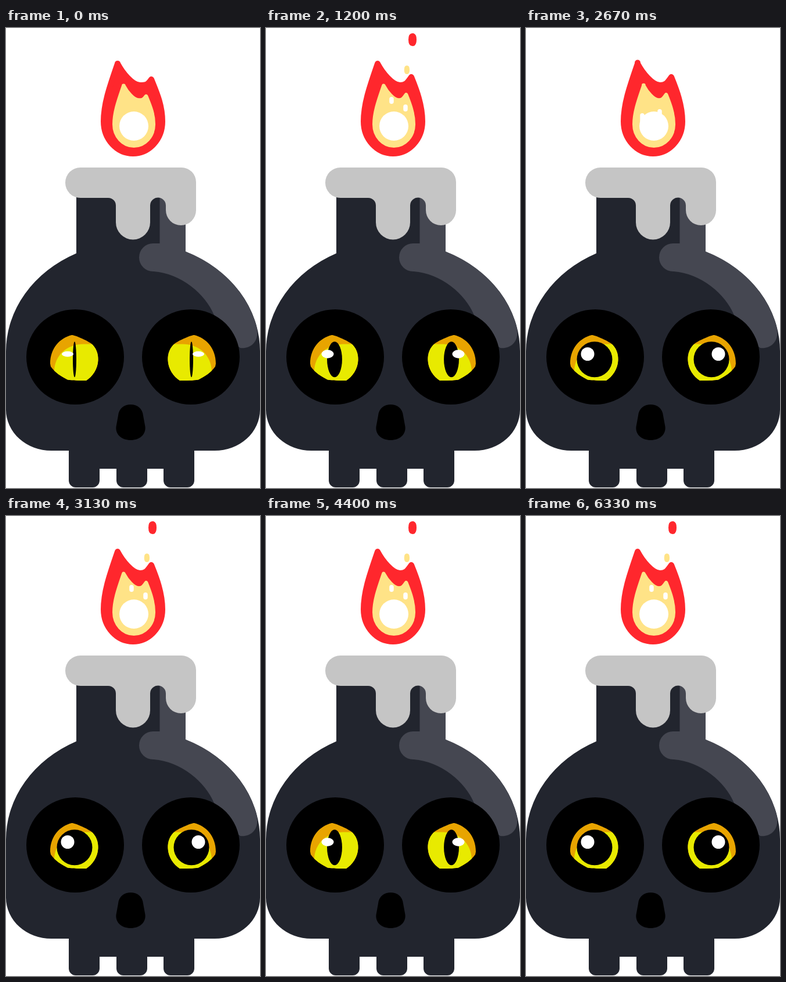
Animation, 437 px wide and 788 px high, one loop 6410 ms. Source, as an HTML page:

```html
<!DOCTYPE html>
<html lang="en">
<head>
<meta charset="utf-8">
<title>Skull candle</title>
<style>
html, body { margin: 0; width: 100%; height: 100%; overflow: hidden; background: #fff; }
svg { display: block; width: 100vw; height: 100vh; }
</style>
</head>
<body>
<svg viewBox="0 0 437 788">
  <defs>
    <clipPath id="lid">
      <path d="M76 575C76 548 93 531 113 526C118 526 135 533 146 540C155 547 159 558 158.500 569C158 584 149 597 138 604C127 604 115 604 106 602.500C95 597 84 590 77 580Z"/>
    </clipPath>
    <path id="flame" stroke-width="10" stroke-linejoin="round"/>
    <g id="eye">
      <ellipse cx="119" cy="563.5" rx="84" ry="81.5"/>
      <g clip-path="url(#lid)">
        <rect x="70" y="520" width="95" height="90" fill="#e8a400"/>
        <path d="M83 610V588C84 560 105 541 135 541.5H165V610Z" fill="#e8ea00"/>
      </g>
      <ellipse id="pupil" cx="118" cy="567.7" ry="30.5"/>
      <ellipse id="glint" cx="106" cy="558.5" fill="#fff"/>
    </g>
  </defs>

  <use href="#flame" fill="#ff272d" stroke="#ff272d"/>
  <use href="#flame" fill="#ffe387" stroke="#ffe387" transform="translate(74.3 58.3) scale(.667)"/>
  <circle cx="220" cy="168" r="25" fill="#fff"/>
  <path id="bubbles" stroke="#fff" stroke-width="7.5" stroke-linecap="round"/>

  <path fill="#22252e" d="M121 270H309V383A218.500 187.700 0 0 1 437 554V654A78 70 0 0 1 359 724H324V775A12 12 0 0 1 312 787H283A12 12 0 0 1 271 775V755H243V775A12 12 0 0 1 231 787H202A12 12 0 0 1 190 775V755H161V775A12 12 0 0 1 149 787H120A12 12 0 0 1 108 775V724H78A78 70 0 0 1 0 654V554A218.500 187.700 0 0 1 121 386Z"/>
  <path fill="#454751" d="M264.500 270H309V383A218.500 187.700 0 0 1 431 511C437 536 422 550 403 548L385 535L358 492C343 455 300 420 253 417A24 24 0 0 1 253 369H264.500Z"/>
  <path fill="#c5c5c5" d="M128 239H302A25 25 0 0 1 327 264V312A26 26 0 0 1 275 312V304A13.500 13.500 0 0 0 248 304V333A29.500 29.500 0 0 1 189 333V304A13 13 0 0 0 176 291H128A26 26 0 0 1 128 239Z"/>
  <use href="#eye"/>
  <use href="#eye" transform="translate(437 0) scale(-1 1)"/>
  <path d="M214.500 645C226 645 235 652 236 664L239.500 683C241 697 229 706 214.500 706C200 706 188 697 189.500 683L193 664C194 652 203 645 214.500 645Z"/>
</svg>
<script>
const LOOP = 6410, BEATS = 8;
const el = id => document.getElementById(id);
const mix = (a, b, s) => a + (b - a) * s;
const clamp = u => Math.min(1, Math.max(0, u));
const smooth = u => u * u * (3 - 2 * u);

const LEFT = { x: 192, y: 56, lean: 6, power: 4, release: 5 };
const RIGHT = { x: 250, y: 79, lean: 2, power: 1.5, release: 7 };
const BUBBLES = [
  { x: 200, y: 146, birth: 1 }, { x: 230, y: 139, birth: 1 },
  { x: 216, y: 136, birth: 4 }, { x: 240, y: 149, birth: 4 }
];

// A tongue sheds a drop, recoils, then stretches into a stem until the next drop
function tongue({ x, y, lean, power, release }, beat) {
  const age = (beat - release + BEATS) % BEATS;
  const rise = 56 * clamp((age - 2) / 5) ** power;
  const stem = clamp((rise - 8) / 14);
  const tip = y + 5 - rise + (age === 1 ? 4 : 0);
  const dropX = x + lean - 2;
  return {
    x: x + lean * stem, tip, stem,
    half: 1.7 * stem,
    neck: Math.max(tip, mix(y + 5, 76, stem)),
    drop: age ? "" : `M${dropX} ${y - 59}a2 6 0 0 1 4 0a2 6 0 0 1 -4 0Z`
  };
}

// Inset by half the stroke, whose round joins soften the tips
function flamePath(beat) {
  const l = tongue(LEFT, beat), r = tongue(RIGHT, beat);
  const vx = 231 - 5 * l.stem - 3 * r.stem;
  const vy = 98 - 6 * Math.max(l.stem, r.stem);
  const lx = l.x + l.half, rx = r.x - r.half, end = r.x + r.half;
  return `M168 160C168 128 180 ${mix(96, 102, l.stem)} ${l.x - l.half} ${l.neck}` +
    `L${l.x - l.half} ${l.tip}H${lx}V${l.neck}` +
    `C${lx + mix(8, 1, l.stem)} ${l.neck + mix(15, 10, l.stem)} ${vx - 14} ${vy} ${vx} ${vy}` +
    `C${vx + 9} ${vy} ${rx - mix(7, 0, r.stem)} ${r.neck + 10} ${rx} ${r.neck}` +
    `V${r.tip}H${end}V${r.neck}` +
    `C${end + mix(9, 3, r.stem)} ${r.neck + 22} 269 132 269 160` +
    `A50.5 55 0 0 1 168 160Z` + l.drop + r.drop;
}

// Bubbles climb while attached, then part from the glow and vanish
function bubblePath(beat) {
  return BUBBLES.map(({ x, y, birth }) => {
    const age = beat - birth;
    if (age < 0 || age > 3) return "";
    return `M${x} ${y - 6 * age + 3.75}v${age < 3 ? 10.5 : 4.5}`;
  }).join("");
}

function draw(ms) {
  // 12.5 steps a second on a 30 Hz clock
  const step = Math.floor(Math.floor((ms % LOOP + 4) * .03) * 5 / 12) % 80;
  const beat = step % BEATS;
  el("flame").setAttribute("d", flamePath(beat));
  el("bubbles").setAttribute("d", bubblePath(beat));

  // Pupils widen once per half loop, then snap shut
  const open = smooth(clamp((step % 40 - 11.95) / 7.5));
  el("pupil").setAttribute("rx", mix(3, 30.5, open));
  el("glint").setAttribute("rx", mix(10, 11.5, open));
  el("glint").setAttribute("ry", mix(4.7, 11.5, open));
}

const start = performance.now();
function tick() {
  draw(performance.now() - start);
  requestAnimationFrame(tick);
}
tick();
</script>
</body>
</html>
```
